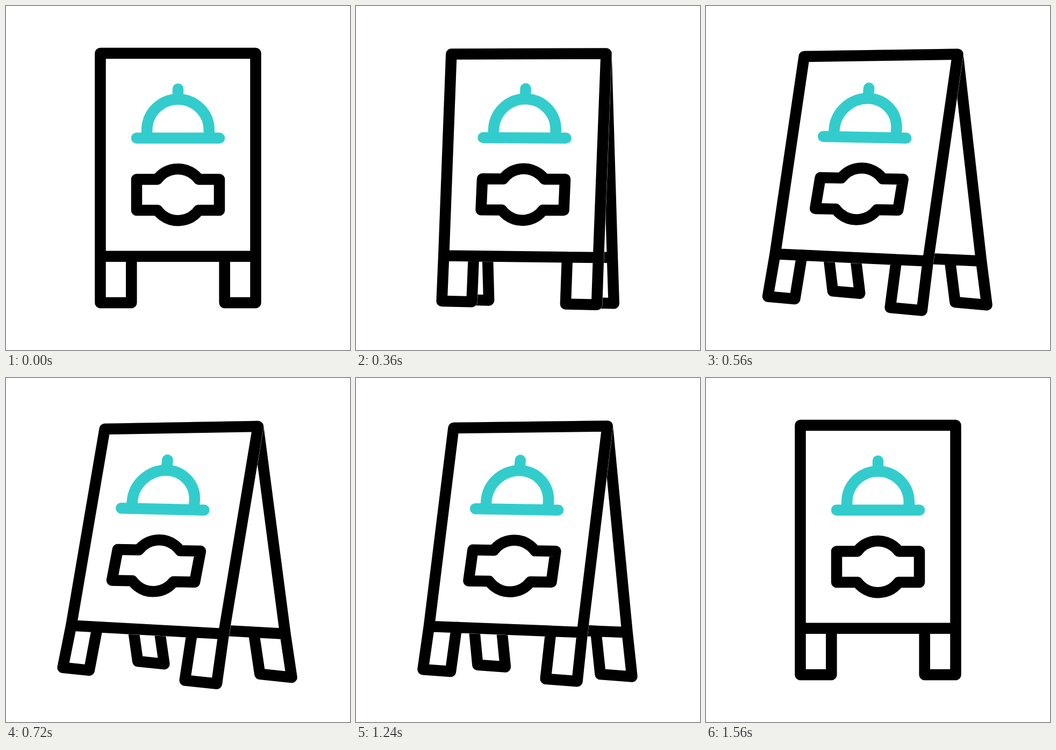
Write an HTML page with a canvas that moves like this. It is 640 by 640 pixels and loops after 1840 ms.

```html
<!DOCTYPE html>
<html lang="en">
<head>
<meta charset="utf-8">
<title>Menu board</title>
<style>
  html, body { margin: 0; width: 100%; height: 100%; overflow: hidden; background: #fff; }
  canvas { display: block; width: 640px; height: 640px; }
</style>
</head>
<body>
<canvas id="stage" width="640" height="640"></canvas>
<script>
const ctx = document.getElementById('stage').getContext('2d');
const LOOP = 1840, TICK = 40, LINE = 20.5;
const BLACK = '#000', TEAL = '#33cccc', WHITE = '#fff';
const LEFT = 175.5, WIDTH = 289;

// Height of each row when closed, its two ends when open,
// and how far the back board moves away from the front one.
const rows = {
  top:  { y: 88,    left: [183.7, 95],    right: [469, 90],    spread: [0, 0] },
  bar:  { y: 465.7, left: [121.3, 460.6], right: [405, 475.9], spread: [114.5, 0] },
  feet: { y: 552,   left: [105.6, 538.7], right: [392, 568.7], spread: [139.6, -11.7] }
};

const mix = (a, b, p) => a + (b - a) * p;

function ease(x) {
  x = Math.min(1, Math.max(0, x));
  const half = v => Math.pow(2 * v, 2.35) / 2;
  return x < 0.5 ? half(x) : 1 - half(1 - x);
}

const openness = t => ease((t - 160) / 560) - ease((t - 1040) / 520);

// Point at the fraction u along a row, foreshortened towards the far left end.
function onRow({ y, left, right, spread }, u, isBack, p) {
  const v = u - 0.22 * u * (1 - u) ** 2;
  const open = i => mix(left[i], right[i], v) + (isBack ? spread[i] : 0);
  return [mix(LEFT + WIDTH * u, open(0), p), mix(y, open(1), p)];
}

function stroke(path, color, width = LINE) {
  ctx.strokeStyle = color;
  ctx.lineWidth = width;
  ctx.stroke(path);
}

function drawBoard(isBack, p) {
  const { top, bar, feet } = rows;
  const path = new Path2D();
  const line = (row, u) => path.lineTo(...onRow(row, u, isBack, p));
  const leg = (first, second) => {
    line(bar, first);
    line(feet, first);
    line(feet, second);
    line(bar, second);
  };
  leg(0.2, 0);
  line(top, 0);
  line(top, 1);
  leg(1, 0.8);
  path.closePath();
  ctx.fillStyle = WHITE;
  ctx.fill(path);
  stroke(path, WHITE, LINE + 0.6); // hairline between the two boards
  path.moveTo(...onRow(bar, 0, isBack, p));
  line(bar, 1);
  stroke(path, BLACK);
}

function drawCloche(p) {
  const shape = new Path2D();
  const r = 57.8, reach = 77, base = 14.5;
  shape.moveTo(-r, base);
  shape.arc(0, 0, r, Math.PI, 0);
  shape.lineTo(r, base);
  shape.moveTo(0, -reach);
  shape.lineTo(0, -r);
  shape.moveTo(-reach, base);
  shape.lineTo(reach, base);
  const posed = new Path2D();
  posed.addPath(shape, new DOMMatrix([
    1, 0.023 * p, -0.1 * p, 1, mix(320, 292.8, p), mix(231.2, 229.5, p)
  ]));
  stroke(posed, TEAL);
}

function drawPlaque(p) {
  const path = new Path2D();
  const cx = mix(320, 279.5, p), cy = mix(351.2, 349.3, p);
  const lean = 0.19 * p, tilt = 0.021 * p;
  const r = 48, halfW = 77, halfH = 28.8, notch = Math.asin(halfH / r);
  const corner = (x, y) => path.lineTo(cx + x - lean * y, cy + y + tilt * x);
  for (const side of [1, -1]) {
    const turn = tilt + (side > 0 ? Math.PI : 0);
    path.arc(cx + side * lean * halfH, cy, r, turn + notch, turn + Math.PI - notch);
    corner(side * halfW, -side * halfH);
    corner(side * halfW, side * halfH);
  }
  path.closePath();
  stroke(path, BLACK);
}

function draw(time) {
  const p = openness(Math.floor(time % LOOP / TICK) * TICK);
  ctx.fillStyle = WHITE;
  ctx.fillRect(0, 0, 640, 640);
  ctx.lineCap = ctx.lineJoin = 'round';
  drawBoard(true, p);
  drawBoard(false, p);
  drawCloche(p);
  drawPlaque(p);
}

const start = performance.now();
function loop() {
  draw(performance.now() - start);
  requestAnimationFrame(loop);
}
loop();
</script>
</body>
</html>
```
